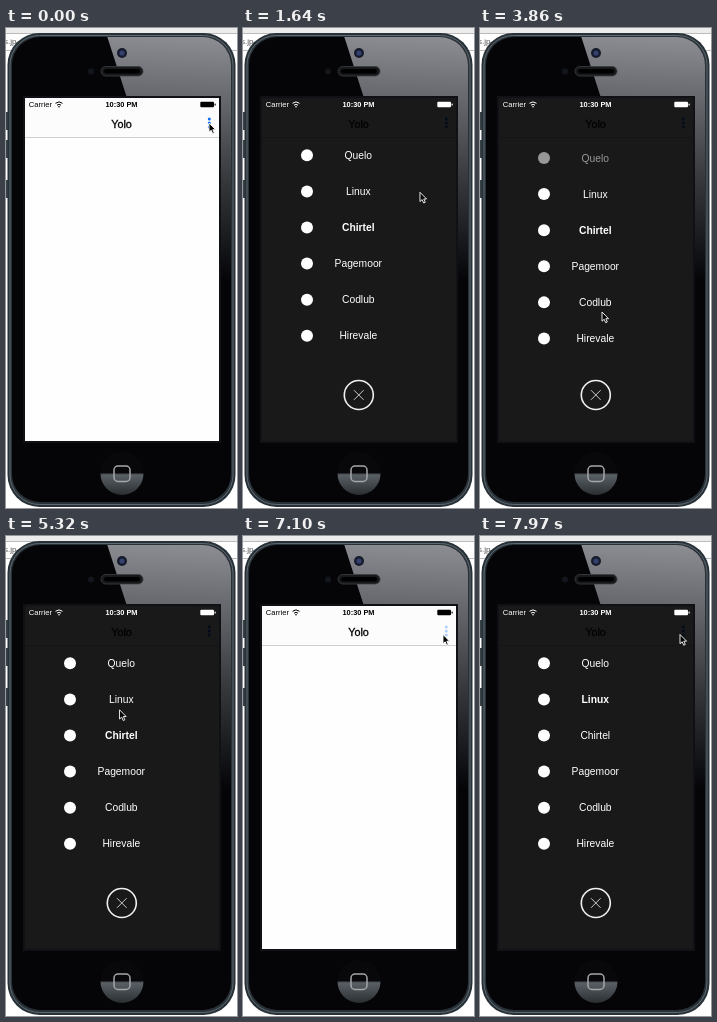
Write an HTML page that moves like this. It is 231x480 px and loops after 8 s.

```html
<!DOCTYPE html>
<html lang="en">
<head>
<meta charset="utf-8">
<title>Context menu</title>
<style>
  html, body { margin: 0; width: 100%; height: 100%; overflow: hidden; background: #fff; }
  svg { display: block; width: 100vw; height: 100vh; }
  text { font-family: "Liberation Sans", Arial, sans-serif; }
</style>
</head>
<body>
<svg viewBox="0 0 231 480">
  <defs>
    <linearGradient id="glare" gradientUnits="userSpaceOnUse" x1="165" y1="8" x2="155" y2="250">
      <stop offset="0" stop-color="#8c8d92"/>
      <stop offset=".25" stop-color="#66686d"/>
      <stop offset=".6" stop-color="#34363a"/>
      <stop offset="1" stop-color="#050508"/>
    </linearGradient>
    <linearGradient id="homeShade" x1="0" x2="0" y1="0" y2="1">
      <stop offset=".48" stop-color="#08080a"/>
      <stop offset=".53" stop-color="#596066"/>
      <stop offset="1" stop-color="#2a2e31"/>
    </linearGradient>
    <clipPath id="glass"><rect x="6" y="9" width="219" height="465" rx="28"/></clipPath>
    <clipPath id="listArea"><rect x="19" y="110" width="194" height="215"/></clipPath>
  </defs>

  <!-- page behind the phone -->
  <rect width="231" height="480" fill="#fff"/>
  <rect width="231" height="5" fill="#ececec"/>
  <path d="M0 5.5H231M0 22.5H231" stroke="#bbb"/>
  <text x="-2" y="16" font-size="8" fill="#555">s.jp</text>

  <!-- phone -->
  <path d="M0 84h4v18h-4zM0 112h4v18h-4zM0 152h4v18h-4z" fill="#39434a"/>
  <rect x="1.500" y="5" width="228" height="474" rx="32" fill="#283138"/>
  <rect x="4" y="7.500" width="223" height="469" rx="29.500" fill="none" stroke="#5f6a70"/>
  <g clip-path="url(#glass)">
    <rect width="231" height="480" fill="#050508"/>
    <path d="M101 8L121 70H213V260H231V0H98Z" fill="url(#glare)"/>
  </g>
  <rect x="18" y="69" width="196" height="345" fill="none" stroke="#101114" stroke-width="2"/>
  <circle cx="116" cy="25" r="5" fill="#161b2b"/>
  <circle cx="116" cy="25" r="2.600" fill="#34406f"/>
  <circle cx="85" cy="43.500" r="3" fill="#14161d"/>
  <rect x="95" y="38.500" width="42" height="9.500" rx="4.700" fill="#17191a" stroke="#3c3f42" stroke-width=".8"/>
  <rect x="98" y="41" width="36" height="4.500" rx="2.200" fill="#000"/>
  <circle cx="116" cy="445.500" r="21.500" fill="url(#homeShade)"/>
  <rect x="108" y="438" width="16" height="15.500" rx="4" fill="none" stroke="#a5a7a9" stroke-width="1.500"/>

  <!-- screen -->
  <rect x="19" y="70" width="194" height="343" fill="#fefefe"/>
  <rect x="19" y="70" width="194" height="39" fill="#fcfcfc"/>
  <path d="M19 109.500H213" stroke="#c4c4c4" stroke-width=".8"/>
  <text x="115.500" y="99.500" font-size="10.800" text-anchor="middle" stroke="#000" stroke-width=".3">Yolo</text>
  <path id="dots" d="M203.300 91v0m0 4v0m0 4v0" stroke="#0a6cff" stroke-width="3" stroke-linecap="round"/>

  <g id="menu">
    <rect x="19" y="70" width="194" height="343" opacity=".9"/>
    <g clip-path="url(#listArea)"><g id="list"></g></g>
    <circle cx="115.800" cy="367" r="14.500" fill="none" stroke="#f0f0f0" stroke-width="1.600"/>
    <path d="M111 362.200l9.600 9.600m0-9.600l-9.600 9.600" stroke="#ddd" stroke-width=".9"/>
  </g>
  <path id="bands" d="M19 70H213V109H19ZM19 372H213V413H19Z" opacity=".045"/>

  <g id="status">
    <text x="22.800" y="79.300" font-size="7.600">Carrier</text>
    <path d="M49.500 75.300q3.500-2.900 7 0M51 77.200q2-1.700 4 0" fill="none" stroke="currentColor"/>
    <circle cx="53" cy="78.700" r=".8"/>
    <text x="115.500" y="79.200" font-size="7.400" font-weight="bold" text-anchor="middle">10:30 PM</text>
    <rect x="194.300" y="73.700" width="13.700" height="5.600" rx="1"/>
    <rect x="208.500" y="75.500" width="1.200" height="2" rx=".5"/>
  </g>

  <path id="cursor" d="M0 0V9.200L2.200 7.300L3.700 10.700L5.300 10L3.800 6.700H6.600Z" fill="#000" stroke="#fff" stroke-width=".9"/>
</svg>
<script>
const $ = id => document.getElementById(id);
const LOOP = 8000, START = 1050, TICK = 147.2;
const ROW = 36.1, FIRST_ROW = 127.3;
const FIRST_OPEN = 920, CLOSE = 5390, SECOND_OPEN = 7102, FADE = 430;
const SWIPE_UP = 2240, SWIPE_DOWN = 3500;
const names = ["Quelo", "Linux", "Chirtel", "Pagemoor", "Codlub", "Hirevale", "Android", "Pictoloom"];

const moves = [
  { from: 1350, to: 2090, x: 126, y: 300 },
  { from: 2240, to: 2820, x: 125, y: 234 },
  { from: 2900, to: 3420, x: 124, y: 212 },
  { from: 3420, to: 3850, x: 122, y: 284 },
  { from: 4650, to: 5470, x: 112.7, y: 163 },
  { from: 6060, to: 6660, x: 200, y: 98.5 }
];

const progress = (t, from, duration) => Math.min(1, Math.max(0, (t - from) / duration));
const smooth = p => p * p * (3 - 2 * p);
const outBack = (p, overshoot) => 1 + (overshoot + 1) * (p - 1) ** 3 + overshoot * (p - 1) ** 2;

function add(parent, tag, attrs) {
  const el = document.createElementNS("http://www.w3.org/2000/svg", tag);
  for (const name in attrs) el.setAttribute(name, attrs[name]);
  return parent.appendChild(el);
}

const rows = names.map((name, i) => {
  const row = add($("list"), "g", { transform: `translate(0 ${FIRST_ROW + i * ROW})`, fill: "#fff" });
  add(row, "circle", { cx: 64, cy: 0, r: 6 });
  const label = add(row, "text", { x: 115.3, y: 3.6, "font-size": 10.3, "text-anchor": "middle" });
  label.textContent = name;
  return { row, label };
});

function scrollAt(t) {
  const up = outBack(progress(t, SWIPE_UP, 1036), 2);
  const down = outBack(progress(t, SWIPE_DOWN, 520), 1);
  return 2 * ROW * (down - up);
}

// Rows fade in whenever they come into view.
function rowOpacity(i, t, opened) {
  let enter = opened + 200;
  if (i >= 6) enter = SWIPE_UP + 350 + 125 * (i - 6);
  else if (i < 2 && t > SWIPE_DOWN && t < CLOSE) enter = SWIPE_DOWN + 70 - 225 * i;
  return progress(t, enter, 500);
}

function cursorAt(t) {
  let x = 203, y = 95;
  for (const move of moves) {
    const p = smooth(progress(t, move.from, move.to - move.from));
    x += (move.x - x) * p;
    y += (move.y - y) * p;
  }
  return `translate(${x} ${y})`;
}

function render(now) {
  // The screen refreshes on a coarse tick.
  const t = now < START ? 0 : START + Math.floor((now - START + 5) / TICK) * TICK;
  const again = t > CLOSE + FADE;
  const opened = again ? SECOND_OPEN : FIRST_OPEN;
  const shown = progress(t, opened, FADE) - (again ? 0 : progress(t, CLOSE, FADE));
  const pressed = t >= opened - 20 && t < opened + 200;
  const light = shown > 0 && (t < CLOSE || again);

  $("menu").setAttribute("opacity", shown);
  $("bands").style.display = pressed && shown ? "" : "none";
  $("list").setAttribute("transform", `translate(0 ${scrollAt(t)})`);
  rows.forEach(({ row, label }, i) => {
    row.setAttribute("opacity", rowOpacity(i, t, opened));
    label.setAttribute("font-weight", i === (again ? 1 : 2) ? "bold" : "normal");
  });
  $("dots").setAttribute("opacity", pressed ? .3 : 1);
  $("status").setAttribute("fill", light ? "#fff" : "#000");
  $("status").setAttribute("color", light ? "#fff" : "#000");
  $("cursor").setAttribute("transform", cursorAt(t));
}

const origin = performance.now();
function loop() {
  render((performance.now() - origin) % LOOP);
  requestAnimationFrame(loop);
}
loop();
</script>
</body>
</html>
```
